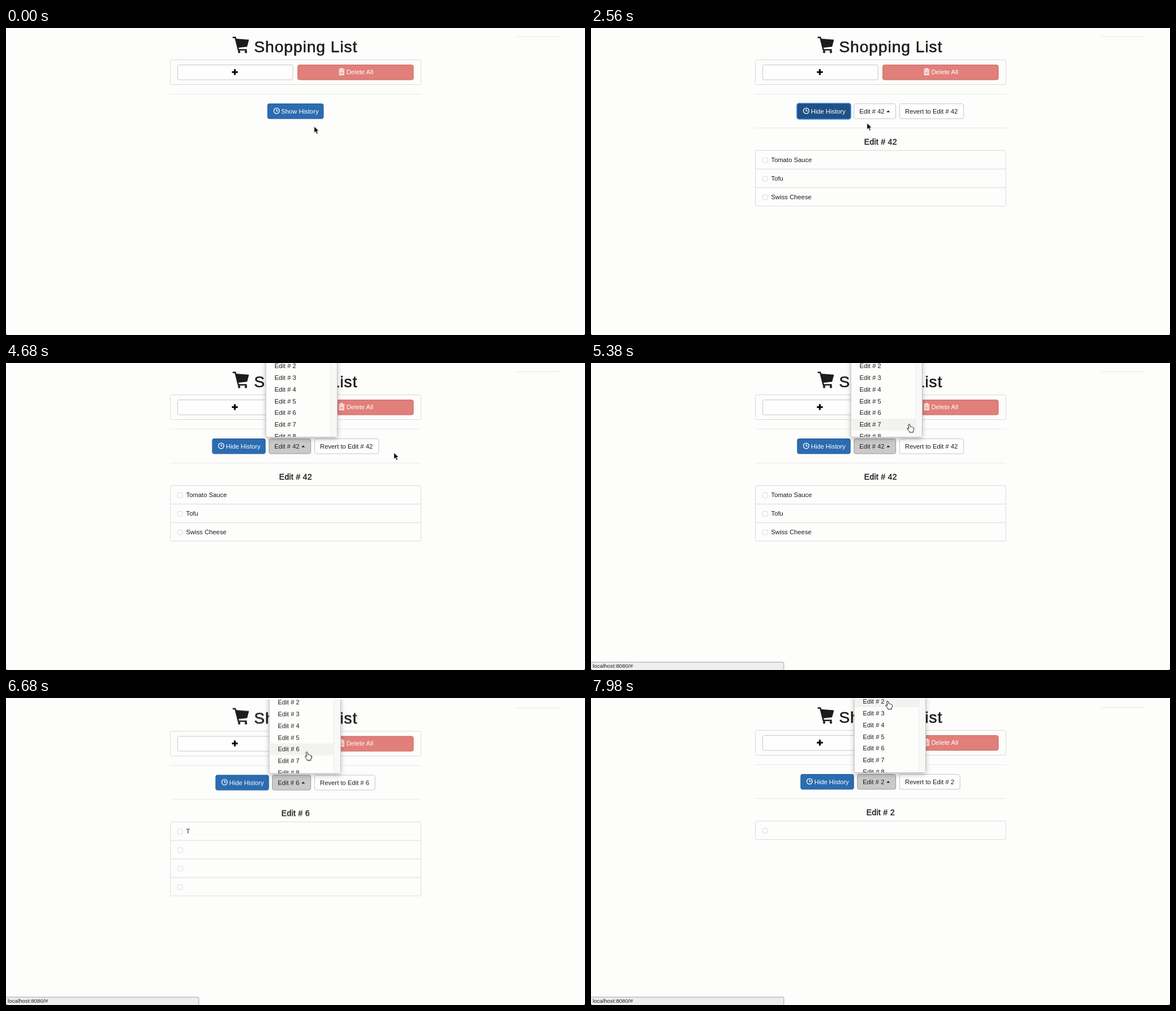
Animation of 1027x545 px, one loop 8000 ms. Source, as an HTML page:

```html
<!DOCTYPE html>
<html lang="en">
<head>
<meta charset="utf-8">
<title>Shopping List</title>
<style>
html, body { margin: 0; width: 100%; height: 100%; overflow: hidden; background: #fdfdfc; }
svg { display: block; width: 1027px; height: 545px; }
text { font: 11.3px "Liberation Sans", Arial, sans-serif; fill: #1c1c1c; white-space: pre; }
.title { font-size: 28.3px; letter-spacing: .92px; stroke: #1c1c1c; stroke-width: .6px; }
.head { font-size: 14.1px; letter-spacing: .3px; text-anchor: middle; stroke: #1c1c1c; stroke-width: .4px; }
.light { fill: #fff; }
.status { font-size: 9.8px; }
.box { fill: none; stroke: #d9d9de; }
.rule { stroke: #e7e7ea; }
.check { fill: #fff; stroke: #d6d6e2; }
.btn { fill: #fefefe; stroke: #c6c6cd; }
.red { fill: #e17f7a; stroke: #cb6a66; }
.blue { fill: #2b6cb0; stroke: #265f9d; }
.pressed { fill: #cacaca; stroke: #9a9a9a; }
.line { fill: none; stroke: #fff; stroke-width: 1.3; }

/* every track shares one 8 s loop */
.step { animation: 8s step-end infinite; }
#home { animation-name: home; }
#v42 { animation-name: v42; }
#v6 { animation-name: v6; }
#v2 { animation-name: v2; }
#menu { animation-name: menu; }
#row { animation-name: row; }
#status { animation-name: status; }
#arrow { animation-name: arrow; }
#hand { animation-name: hand; }
#home .blue { animation-name: show; }
#v42 .blue { animation-name: hide; }
#v42 .glow { animation-name: glow; }
#v42 .edit { animation-name: edit; }
#v42 .revert { animation-name: revert; }
#page { animation: scroll 8s linear infinite; }
#cursor { animation: move 8s linear infinite; }

@keyframes home { 0% { visibility: visible } 10%, 100% { visibility: hidden } }
@keyframes v42 { 0% { visibility: hidden } 10% { visibility: visible } 71.25%, 100% { visibility: hidden } }
@keyframes v6 { 0% { visibility: hidden } 71.25% { visibility: visible } 95.6%, 100% { visibility: hidden } }
@keyframes v2 { 0% { visibility: hidden } 95.6%, 100% { visibility: visible } }
@keyframes menu {
  0% { visibility: hidden; transform: none }
  41.25% { visibility: visible; transform: none }
  71.25%, 100% { visibility: visible; transform: translateX(6px) }
}
@keyframes row {
  0% { visibility: hidden; transform: translateY(104.25px) }
  66.75% { visibility: visible; transform: translateY(104.25px) }
  68.4% { visibility: visible; transform: translateY(83.4px) }
  88.8% { visibility: visible; transform: translateY(62.55px) }
  90.2% { visibility: visible; transform: translateY(41.7px) }
  91.6% { visibility: visible; transform: translateY(20.85px) }
  93.1%, 100% { visibility: visible; transform: none }
}
@keyframes status { 0% { visibility: hidden } 66.75%, 100% { visibility: visible } }
@keyframes hand {
  0% { visibility: hidden } 4% { visibility: visible }
  16.7% { visibility: hidden } 17.5% { visibility: visible }
  21.8% { visibility: hidden } 34.9% { visibility: visible }
  46% { visibility: hidden } 62.6% { visibility: visible }
  64.2% { visibility: hidden } 66.75%, 100% { visibility: visible }
}
@keyframes arrow {
  0% { visibility: visible } 4% { visibility: hidden }
  16.7% { visibility: visible } 17.5% { visibility: hidden }
  21.8% { visibility: visible } 34.9% { visibility: hidden }
  46% { visibility: visible } 62.6% { visibility: hidden }
  64.2% { visibility: visible } 66.75%, 100% { visibility: hidden }
}
@keyframes show { 0% { fill: #2b6cb0 } 4%, 100% { fill: #225588 } }
@keyframes hide { 0% { fill: #1f5186 } 41.25%, 100% { fill: #2b6cb0 } }
@keyframes glow { 0% { opacity: 1 } 41.25%, 100% { opacity: 0 } }
@keyframes edit {
  0% { fill: #fefefe; stroke: #c6c6cd }
  17.5% { fill: #dedede; stroke: #adadad }
  21.8% { fill: #fefefe; stroke: #c6c6cd }
  34.9% { fill: #dedede; stroke: #adadad }
  41.25%, 100% { fill: #cacaca; stroke: #9a9a9a }
}
@keyframes revert {
  0% { fill: #dedede; stroke: #adadad }
  16.7% { fill: #fefefe; stroke: #c6c6cd }
  62.6% { fill: #dedede; stroke: #adadad }
  64.2%, 100% { fill: #fefefe; stroke: #c6c6cd }
}
@keyframes scroll {
  0%, 82% { transform: none }
  83%, 86% { transform: translateY(2.4px) }
  91%, 100% { transform: translateY(1px) }
}
@keyframes move {
  0%, 2.5% { transform: translate(546.5px, 174.5px) }
  6.25%, 16.25% { transform: translate(550.5px, 140px) }
  23.75%, 33.75% { transform: translate(489.5px, 168.5px) }
  36.9%, 43.75% { transform: translate(503px, 148px) }
  53.75%, 61.25% { transform: translate(688px, 159px) }
  68.75%, 87.5% { transform: translate(533.5px, 95.5px) }
  93.75%, 100% { transform: translate(526px, 5px) }
}
</style>
</head>
<body>
<svg viewBox="0 0 1027 545">
  <defs>
    <clipPath id="pageClip"><rect width="1027" height="560"/></clipPath>
    <clipPath id="menuClip"><rect x="461" width="127" height="131"/></clipPath>
    <g id="clock" class="line"><circle r="4.9"/><path d="M0-3V.3H2.6"/></g>
  </defs>

  <g id="page" clip-path="url(#pageClip)">
    <path class="rule" d="M905 15.5H983M291 117.5H736"/>
    <g fill="#1c1c1c">
      <path d="M402 15.5h5.6l1.1 3.6 22.3 1.6-3.3 12.6-15.2 1.8.7 2.4h14v2.4h-16L405.700 18H402z"/>
      <rect x="411.500" y="40" width="4" height="4.600" rx="1.500"/>
      <rect x="423.500" y="40" width="4" height="4.600" rx="1.500"/>
      <path d="M404.400 73h3v3.800h3.800v3h-3.800v3.700h-3v-3.700h-3.700v-3h3.700z" id="plus"/>
    </g>
    <text class="title" x="440" y="43">Shopping List</text>
    <rect class="box" x="291.5" y="56.5" width="444.500" height="44" rx="3"/>
    <rect class="btn" x="304.500" y="65.500" width="204.500" height="26.500" rx="3"/>
    <use href="#plus"/>
    <rect class="red" x="517.500" y="65.500" width="205" height="26.500" rx="3"/>
    <path class="line" stroke-width="1" d="M590 73.700h10.600M593.500 73.500v-1.600h3.600v1.600M591.500 76v7h7.700v-7zM593.900 76v7M596.800 76v7"/>
    <text class="light" x="603.700" y="82.300">Delete All</text>

    <g id="home" class="step">
      <rect class="blue step" x="464" y="134.500" width="99" height="26.500" rx="3"/>
      <use href="#clock" x="480" y="147"/>
      <text class="light" x="488" y="151.500">Show History</text>
    </g>
    <g id="views"></g>

    <g id="menu" class="step">
      <rect x="461" y="-20" width="126.500" height="151.500" rx="3" fill="#fdfdfc" stroke="#c4c4c4" style="filter:drop-shadow(0 3px 4px rgba(0,0,0,.25))"/>
      <g clip-path="url(#menuClip)">
        <rect id="row" class="step" x="461.500" y="-5.400" width="114" height="20.850" fill="#f2f2f0"/>
        <path d="M575.500 0h11.500v131h-11.500z" fill="#f8f8f7"/>
        <path d="M575.500 0v131" stroke="#ececec"/>
        <g id="items"></g>
      </g>
    </g>
  </g>

  <g id="status" class="step">
    <rect x="-.5" y="531" width="342.500" height="16" rx="2" fill="#eeeeee" stroke="#a2a2a2"/>
    <text class="status" x="3" y="541.300">localhost:8080/#</text>
  </g>
  <path d="M0 542.500q.3 2.200 2.500 2.500H0zM1027 542.500q-.3 2.200-2.500 2.500h2.500z" fill="#444"/>

  <g id="cursor">
    <path id="arrow" class="step" d="M0 0v11.800l2.700-2.500 2 4.500 2.200-.9-2-4.400h3.700z" fill="#000" stroke="#fff" stroke-width=".9"/>
    <path id="hand" class="step" d="M-1.300 1.200Q0-.8 1.300 1.200L2.300 5.300Q3.700 4.300 4.400 5.800 5.700 5 6.400 6.400 8 6 8.300 7.800L8.400 10.500 7.200 13V15H.6V13.300L-3.400 8.800Q-3.500 6.900-1.700 7.500L-.2 8.700z" fill="#fff" stroke="#111" stroke-linejoin="round"/>
  </g>
</svg>
<script>
const TOP = 217.5, ROW = 32.9;

const button = (cls, x, w) =>
  `<rect class="${cls}" x="${x}" y="134.5" width="${w}" height="26.5" rx="3"/>`;

function listRow(label, i) {
  const y = TOP + i * ROW;
  return (i ? `<path class="box" d="M291.5 ${y}H736"/>` : "") +
    `<rect class="check" x="304.5" y="${y + 13}" width="9" height="8.5" rx="2"/>` +
    `<text x="319.5" y="${y + 20.6}">${label}</text>`;
}

// Shorter edit numbers narrow the buttons, so the centred bar shifts
function view(edit, rows) {
  const wide = edit > 9, x = wide ? 366 : 372, name = `Edit # ${edit}`;
  const glow = wide ? `<rect class="glow step" x="${x - .5}" y="134" width="95" height="27.5" rx="3.5"
    fill="none" stroke="#5a9fee" stroke-width="2.4"/>` : "";
  return `<g id="v${edit}" class="step">` +
    glow + button("blue step", x, 94) +
    `<use href="#clock" x="${x + 15.7}" y="147"/>` +
    `<text class="light" x="${x + 24}" y="151.500">Hide History</text>` +
    button(wide ? "btn edit step" : "pressed", x + 100.5, wide ? 74 : 68) +
    `<text x="${x + 110}" y="151.500">${name}</text>` +
    `<path d="M524 149.500l3.200-3.300 3.200 3.300z" fill="#1c1c1c"/>` +
    button("btn revert step", 547.5, wide ? 113.5 : 107) +
    `<text x="557" y="151.500">Revert to ${name}</text>` +
    `<path class="rule" d="M291 177.500H736"/>` +
    `<text class="head" x="513.700" y="206.500">${name}</text>` +
    `<rect class="box" x="291.500" y="${TOP}" width="444.500" height="${rows.length * ROW}" rx="3"/>` +
    rows.map(listRow).join("") + `</g>`;
}

document.getElementById("views").innerHTML =
  view(42, ["Tomato Sauce", "Tofu", "Swiss Cheese"]) +
  view(6, ["T", "", "", ""]) +
  view(2, [""]);

document.getElementById("items").innerHTML = [2, 3, 4, 5, 6, 7, 8].map(n =>
  `<text x="476.300" y="${9 + (n - 2) * 20.85}">Edit # ${n}</text>`).join("");
</script>
</body>
</html>
```
